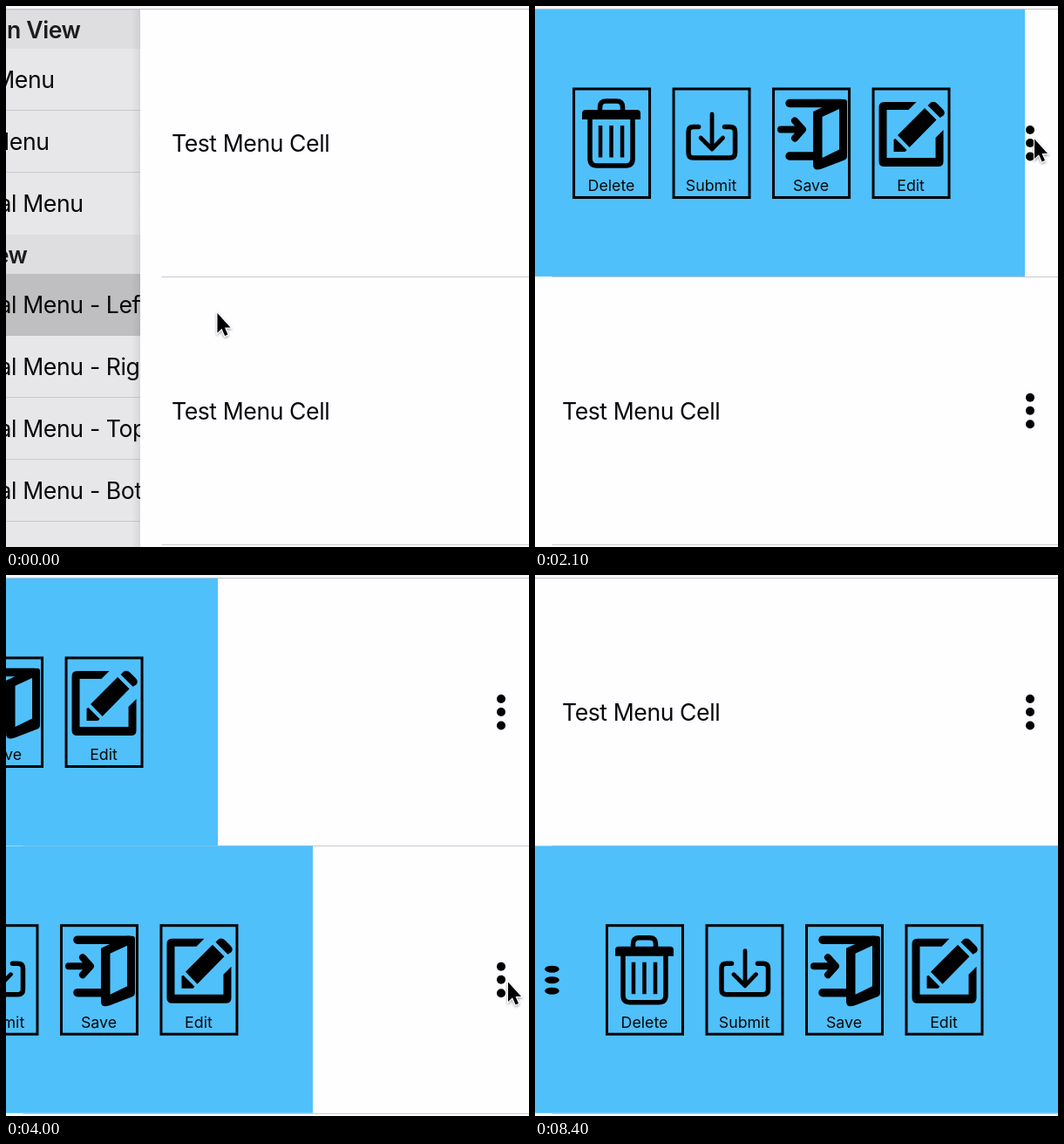
Animation of 600x620 px, one loop 8.5 s. Source, as an HTML page:

```html
<!DOCTYPE html>
<html lang="en">
<head>
<meta charset="utf-8">
<title>Cell menus</title>
<style>
  html, body { margin: 0; width: 100%; height: 100%; overflow: hidden; background: #fefdff; }
  svg { display: block; width: 600px; height: 620px; }
  text { font: 26.6px Inter, Roboto, sans-serif; letter-spacing: -.42px; fill: #080808; }
  .header { font-weight: 600; fill: #1c1c1e; }
  .label { font-size: 17.8px; letter-spacing: 0; text-anchor: middle; }
  .end { text-anchor: end; }
  .rule { stroke: #c9c8cc; }
  .line { fill: none; stroke: #000; stroke-linejoin: round; stroke-linecap: round; }
</style>
</head>
<body>
<svg viewBox="0 0 600 620">
  <defs>
    <linearGradient id="shade">
      <stop offset="0" stop-opacity="0"/>
      <stop offset="1" stop-opacity=".07"/>
    </linearGradient>
    <filter id="soft" x="-50%" y="-50%" width="200%" height="200%">
      <feDropShadow dx="0" dy="1.5" stdDeviation="1.5" flood-opacity=".4"/>
    </filter>
    <clipPath id="page"><path d="M-5 0H800V620H-5Z"/></clipPath>
    <g id="trash">
      <path d="M15 119H74Q78 119 78 123V130H11V123Q11 119 15 119Z"/>
      <path class="line" stroke-width="5.5" d="M31.500 120V116Q31.500 109 38.500 109H50.500Q57.500 109 57.500 116V120M20 128V175Q20 183 28 183H61Q69 183 69 175V128"/>
      <path class="line" stroke-width="4.500" style="stroke-linecap:butt" d="M32 137V173.500M44.500 137V173.500M57 137V173.500"/>
    </g>
    <g id="tray" class="line" stroke-width="5.5">
      <path d="M30 138.500H24Q18.500 138.500 18.500 144V168Q18.500 174 24 174H66Q72 174 72 168V144Q72 138.500 66 138.500H60"/>
      <path stroke-width="4.800" d="M45.500 124V164M32.500 151L45.500 164L58 151"/>
    </g>
    <g id="door">
      <path class="line" stroke-width="9.500" d="M20 111.500H79M20 172H50"/>
      <path class="line" stroke-width="8" d="M10 141.500H32M26 131.500L35 141.500L26 151.500"/>
      <path fill-rule="evenodd" d="M47 121L77 107H83Q86 107 86 110V172Q86 175 83 176.500L57 186.500Q47 190 47 182ZM57.500 127L77 118V164.500L57.500 174Z"/>
    </g>
    <g id="pencil">
      <path d="M51 110H14Q8 110 8 116V178Q8 184 14 184H76Q82 184 82 178V142L73 151V174H17V119H42Z"/>
      <path d="M25 153L27 152L40 165L38 167H25ZM29.500 148L60.500 117L74 130.500L43 162ZM64 114L67 111Q71 108 75 112L81 118Q85 122 82 125.500L78 128Z"/>
    </g>
    <g id="dots">
      <circle cx="568" cy="142" r="5"/><circle cx="568" cy="157" r="5"/><circle cx="568" cy="172.5" r="5"/>
    </g>
  </defs>
  <g id="oldView"></g>
  <rect width="600" height="4" fill="#f7f6f8"/>
  <path d="M0 3.800H600" stroke="#b9b8bb"/>
  <g id="newView" clip-path="url(#page)"></g>
  <path id="cursor" filter="url(#soft)" stroke="#fff" stroke-width="2" paint-order="stroke"
    d="M0 0V22.500L5 17.700L8.600 26L12 24.500L8.500 16.500H15Z"/>
</svg>
<script>
const LOOP = 8500, STEP = 100, WIDTH = 605, ROW = 306.7;
const find = id => document.getElementById(id);

const header = (y, end, text) =>
  `<rect x="-5" y="${y}" width="800" height="45" fill="#dedde0"/>
   <text class="header end" x="${end}" y="${y + 33}">${text}</text>`;
const rule = (y, x) => `<path class="rule" d="M${x} ${y}H1000"/>`;

// The list being pushed away, placed as it stands at the start of the loop.
find('oldView').innerHTML =
  '<rect x="-5" width="800" height="620" fill="#e7e6e9"/>' +
  header(4, 85.5, 'In View') + header(262, 24.5, 'View') +
  '<rect x="-5" y="307" width="800" height="71" fill="#bfbec0"/>' +
  [119.5, 190.5, 448.5, 519.5, 590.5].map(y => rule(y, -5)).join('') +
  [55.5, 49.5, 88.5].map((x, i) => `<text class="end" x="${x}" y="${94 + 71 * i}">Menu</text>`).join('') +
  `<text class="end" x="12" y="236">al</text>` +
  ['Left', 'Right', 'Top', 'Bottom'].map((side, i) => {
    const y = 352 + 71 * i;
    return `<text class="end" x="12" y="${y}">al</text>
      <text class="end" x="88.5" y="${y}">Menu</text><text x="96" y="${y}">- ${side}</text>`;
  }).join('');

const actions = [['Delete', 'trash'], ['Submit', 'tray'], ['Save', 'door'], ['Edit', 'pencil']];
const buttons = actions.map(([label, icon], i) =>
  `<g transform="translate(${81 + 114.5 * i})">
     <rect x="1.500" y="95" width="87" height="124.500" fill="none" stroke="#000" stroke-width="3"/>
     <use href="#${icon}"/><text class="label" x="44.500" y="212">${label}</text>
   </g>`).join('');
const menuDots = [145, 157.5, 170].map(y => `<ellipse cx="19.500" cy="${y}" rx="8.300" ry="4"/>`).join('');

const cell = i =>
  `<g transform="translate(0 ${ROW * i})">
     <text x="31" y="167">Test Menu Cell</text><use href="#dots"/>
     <g id="menu${i}"><rect x="-5" y="3.700" width="605" height="306.300" fill="#50c0fa"/>${menuDots}${buttons}</g>
   </g>`;

find('newView').innerHTML =
  '<rect x="-5" y="4.300" width="800" height="620" fill="#fefdff"/>' +
  rule(310.5, 19.5) + rule(617.3, 19.5) + cell(0) + cell(1);
find('oldView').insertAdjacentHTML('afterend',
  '<rect id="edge" x="-15" y="4" width="10" height="620" fill="url(#shade)"/>');

// Cubic ease-in-out with control points (.42, 0) and (.58, 1).
function easeInOut(u) {
  if (u <= 0) return 0;
  if (u >= 1) return 1;
  let low = 0, high = 1, s;
  for (let i = 0; i < 24; i++) {
    s = (low + high) / 2;
    const x = 1.26 * s * (1 - s) ** 2 + 1.74 * s * s * (1 - s) + s ** 3;
    if (x < u) low = s; else high = s;
  }
  return s * s * (3 - 2 * s);
}
const slide = (t, start) => easeInOut((t - start) / 1046);

// time, x, y
const cursorPath = [
  [0, 242.5, 352], [900, 571, 160], [1100, 573, 152.5], [2200, 573, 152.5],
  [2500, 556, 388], [3100, 573, 459], [3300, 576, 466.5], [4450, 576, 466.5], [4800, 625, 440]
];
function cursorAt(t) {
  const next = cursorPath.findIndex(key => key[0] > t);
  if (next < 0) return cursorPath[cursorPath.length - 1].slice(1);
  const [t0, x0, y0] = cursorPath[next - 1], [t1, x1, y1] = cursorPath[next];
  const u = (t - t0) / (t1 - t0), k = u * u * (3 - 2 * u);
  return [x0 + (x1 - x0) * k, y0 + (y1 - y0) * k];
}

const move = (id, x, y = 0) => find(id).setAttribute('transform', `translate(${x} ${y})`);

function draw(now) {
  const t = Math.floor(now % LOOP / STEP) * STEP;
  const push = t < 800 ? 159 * Math.exp(-t / 110) : 0;
  move('newView', push);
  move('edge', push);
  move('oldView', (push - 159) * .3);
  find('oldView').style.display = push ? '' : 'none';
  const second = slide(t, 3422);
  move('menu0', (slide(t, 1238) - second - 1) * WIDTH);
  move('menu1', (second - 1) * WIDTH);
  move('cursor', ...cursorAt(t));
}

const start = performance.now();
function tick() {
  draw(performance.now() - start);
  requestAnimationFrame(tick);
}
tick();
</script>
</body>
</html>
```
